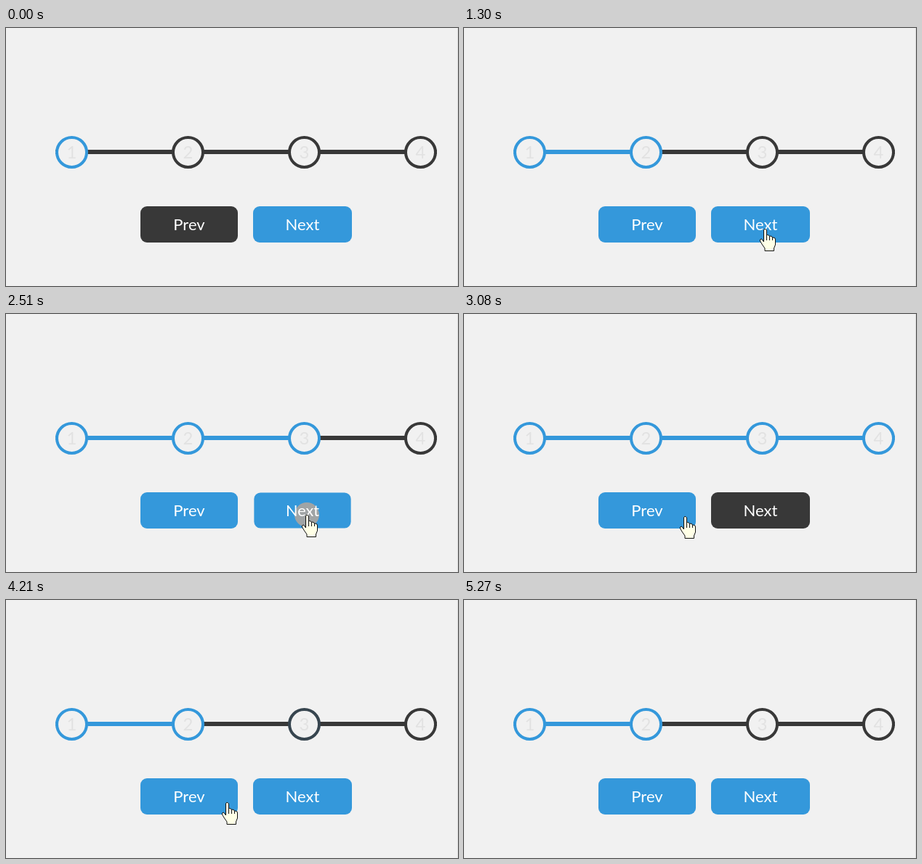
An HTML page with a canvas that plays this animation: 622x356 px, repeating every 5580 ms.

```html
<!DOCTYPE html>
<html lang="en">
<head>
<meta charset="utf-8">
<title>Progress steps</title>
<style>
  html, body { margin: 0; width: 100%; height: 100%; overflow: hidden; background: #f1f1f1; }
  canvas { display: block; }
</style>
</head>
<body>
<canvas id="stage" width="622" height="356"></canvas>
<script>
const ctx = document.getElementById('stage').getContext('2d');
const LOOP = 5580, FADE = 400;
const BG = '#f1f1f1', BLUE = [52, 152, 219], DARK = [56, 56, 56];
const FONT = 'Lato, "Open Sans", sans-serif';

const PREV = { label: 'Prev', x: 185, y: 246, w: 134, h: 50 };
const NEXT = { label: 'Next', x: 340, y: 246, w: 136, h: 50 };

const clicks = [
  { down: 760, up: 880, button: NEXT, from: 0, to: 1 },
  { down: 1620, up: 1690, button: NEXT, from: 1, to: 2 },
  { down: 2510, up: 2610, button: NEXT, from: 2, to: 3 },
  { down: 3380, up: 3470, button: PREV, from: 3, to: 2 },
  { down: 3960, up: 3985, button: PREV, from: 2, to: 1 }
];

// Pointer legs: start and end time, then start, control and end points
const legs = [
  { t: [250, 590], p: [[464, 358], [440, 300], [414, 277]], out: true },
  { t: [2690, 3040], p: [[414, 277], [360, 276], [305, 279]] },
  { t: [3040, 3080], p: [[305, 279], [304, 279], [304, 279]] },
  { t: [4240, 4500], p: [[304, 279], [400, 362], [523, 184]] },
  { t: [4500, 4720], p: [[523, 184], [528, 100], [533, 35]], out: true },
  { t: [4900, 5030], p: [[533, 35], [528, 10], [519, 0]] },
  { t: [5030, 5270], p: [[519, 0], [585, 110], [597, 358]] }
];

const hand = [5.5,2, 6.5,.5, 8,.5, 9.5,2, 9.5,9, 10.5,8.5, 12.5,9, 13.5,10.5, 15,10, 17,11, 17.5,12.5,
  19,12, 21,13, 21.5,15, 21.5,22, 19.5,27, 19.5,30.5, 7,30.5, 7,27, 3.5,22, .5,17, .5,15, 2.5,14, 5.5,18];
const arrow = [.5,.5, .5,19.5, 4.5,15.5, 8,23.5, 11,22, 7.5,14.5, 14,14.5];

const rgb = c => `rgb(${c.map(Math.round)})`;
const mix = (a, b, k) => a.map((v, i) => v + (b[i] - v) * k);
const clamp = v => Math.min(1, Math.max(0, v));

// CSS "ease": cubic-bezier(.25, .1, .25, 1)
function ease(x) {
  if (x <= 0 || x >= 1) return clamp(x);
  const curve = (s, a, b) => 3 * s * (1 - s) ** 2 * a + 3 * s * s * (1 - s) * b + s ** 3;
  let lo = 0, hi = 1;
  for (let i = 0; i < 24; i++) {
    const mid = (lo + hi) / 2;
    if (curve(mid, .25, .25) < x) lo = mid; else hi = mid;
  }
  return curve(lo, .1, 1);
}

function pointerAt(t) {
  if (t < legs[0].t[0] || t >= 5270) return null;
  const leg = legs.filter(l => t >= l.t[0]).pop();
  const u = clamp((t - leg.t[0]) / (leg.t[1] - leg.t[0]));
  const k = leg.out ? 1 - (1 - u) ** 2 : u * u * (3 - 2 * u);
  const [a, b, c] = leg.p;
  return [0, 1].map(i => (1 - k) ** 2 * a[i] + 2 * k * (1 - k) * b[i] + k * k * c[i]);
}

function text(str, x, y, size, color) {
  ctx.font = `${size}px ${FONT}`;
  ctx.textAlign = 'center';
  ctx.fillStyle = color;
  ctx.fillText(str, x, y);
}

function drawSteps(from, to, k) {
  const level = from + (to - from) * k;
  ctx.fillStyle = rgb(DARK);
  ctx.fillRect(68, 168, 525, 6);
  ctx.fillStyle = rgb(BLUE);
  ctx.fillRect(68, 168, 525 * level / 3, 6);

  for (let i = 0; i < 4; i++) {
    const x = 90.5 + 160 * i;
    const before = i <= from ? BLUE : DARK, after = i <= to ? BLUE : DARK;
    ctx.beginPath();
    ctx.arc(x, 171.5, 20.5, 0, 7);
    ctx.fillStyle = BG;
    ctx.fill();
    ctx.lineWidth = 4;
    ctx.strokeStyle = rgb(mix(before, after, k));
    ctx.stroke();
    text(i + 1, x, 180, 24, '#e2e2e2');
  }
}

function drawButton(b, enabled, pressed, tip) {
  const cx = b.x + b.w / 2, cy = b.y + b.h / 2;
  ctx.save();
  if (pressed) {
    ctx.translate(cx, cy);
    ctx.scale(.98, .98);
    ctx.translate(-cx, -cy);
  }
  ctx.fillStyle = rgb(enabled ? BLUE : DARK);
  ctx.beginPath();
  ctx.roundRect(b.x, b.y, b.w, b.h, 9);
  ctx.fill();
  ctx.restore();
  if (tip) {
    ctx.fillStyle = 'rgba(172, 166, 160, .9)';
    ctx.beginPath();
    ctx.arc(tip[0], tip[1], 17, 0, 7);
    ctx.fill();
  }
  text(b.label, cx, 279, pressed ? 21.6 : 22, '#fff');
}

function polygon(pts) {
  ctx.beginPath();
  for (let i = 0; i < pts.length; i += 2) ctx.lineTo(pts[i], pts[i + 1]);
  ctx.closePath();
  ctx.fillStyle = '#ffffe6';
  ctx.strokeStyle = '#111';
  ctx.lineWidth = 1;
  ctx.fill();
  ctx.stroke();
}

function drawPointer([x, y], isHand) {
  ctx.save();
  ctx.translate(Math.round(x) - (isHand ? 7 : 0), Math.round(y));
  polygon(isHand ? hand : arrow);
  if (isHand) {
    ctx.beginPath();
    for (const [lx, top] of [[9.5, 9], [13.5, 10], [17.5, 12]]) {
      ctx.moveTo(lx, top);
      ctx.lineTo(lx, 16);
    }
    ctx.stroke();
  }
  ctx.restore();
}

function draw(t) {
  ctx.fillStyle = BG;
  ctx.fillRect(0, 0, 622, 356);
  ctx.fillStyle = '#dedede';
  ctx.fillRect(621, 0, 1, 356);

  const last = clicks.filter(c => t >= c.up).pop() || { up: 0, from: 0, to: 0 };
  drawSteps(last.from, last.to, ease((t - last.up) / FADE));

  const press = clicks.find(c => t >= c.down && t < c.up);
  const ripple = clicks.find(c => t >= c.down && t < Math.max(c.up, c.down + 80));
  const tip = pointerAt(t);
  const enabled = b => b === PREV ? last.to > 0 : last.to < 3;
  const over = b => tip && enabled(b) && tip[0] >= b.x && tip[0] < b.x + b.w
    && tip[1] >= b.y && tip[1] < b.y + b.h;

  for (const b of [PREV, NEXT]) {
    drawButton(b, enabled(b), press && press.button === b, ripple && ripple.button === b && tip);
  }
  if (tip) drawPointer(tip, over(PREV) || over(NEXT));
}

const start = performance.now();
function tick() {
  draw((performance.now() - start) % LOOP);
  requestAnimationFrame(tick);
}
tick();
</script>
</body>
</html>
```
